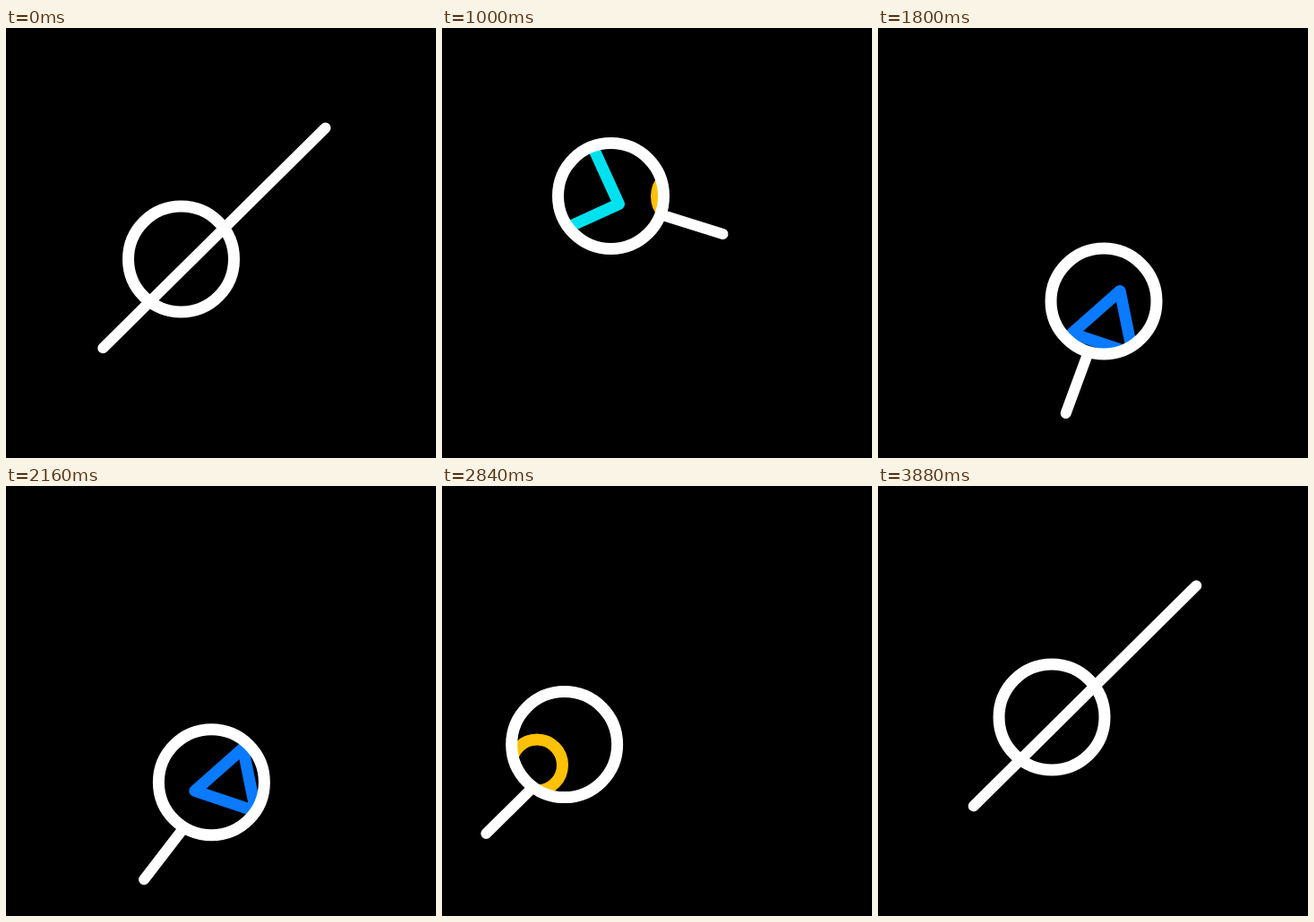
These frames come from a looping animation (480x480 px, 4.48 s). An HTML page with a canvas:

```html
<!DOCTYPE html>
<html lang="en">
<head>
<meta charset="utf-8">
<title>Magnifying glass</title>
<style>
  html, body { margin: 0; width: 100%; height: 100%; overflow: hidden; background: #000; }
  canvas { display: block; }
</style>
</head>
<body>
<canvas width="480" height="480"></canvas>
<script>
const ctx = document.querySelector('canvas').getContext('2d');
const LOOP = 4480, STEP = 40, MOVE_END = 3880;
const LENS_RADIUS = 59, SHAPE_LIFE = 1000;

// Points the lens passes through: time, x, y
const path = [
  [0, 195.5, 258], [360, 239.5, 204], [560, 219, 178], [1000, 188.5, 187.5],
  [1120, 182.5, 199.5], [1800, 252, 305], [2240, 214.5, 331], [2440, 158.5, 321],
  [2800, 137, 291.5], [3240, 156, 264], [3360, 170.5, 259.5], [3880, 194, 258]
];

// Shapes drift by (dx, dy) per second and are at (x, y) at time `at`; no sides means a circle.
const shapes = [
  { color: '#ffc107', at: 360, x: 244, y: 180, dx: 37.5, dy: 12.5, radius: 28.5 },
  { color: '#00e1ef', at: 1000, x: 149.8, y: 178.7, dx: 37.5, dy: 12.5, radius: 50.9, sides: 4, turn: 20.5 },
  { color: '#0a7aff', at: 1800, x: 257, y: 332.7, dx: -15.6, dy: -1.6, radius: 41.4, sides: 3, turn: -71.5 },
  { color: '#ffc107', at: 2840, x: 106, y: 311.5, dx: 10, dy: -3.8, radius: 28.5 }
];

const radians = degrees => degrees * Math.PI / 180;
const clamp = (v, low, high) => Math.min(high, Math.max(low, v));

function smooth(t, from, to) {
  const p = clamp((t - from) / (to - from), 0, 1);
  return p * p * (3 - 2 * p);
}

// Half turn of the handle: speeds up until `middle`, then slows down.
function turnProgress(t) {
  const middle = 1180, end = 2800;
  return t < middle
    ? (t / middle) ** 2.25 / 2
    : 1 - (Math.max(0, end - t) / (end - middle)) ** 2.65 / 2;
}

function slope(i, axis) {
  if (i === 0 || i === path.length - 1) return 0;
  const [a, b, c] = path.slice(i - 1, i + 2);
  const before = b[0] - a[0], after = c[0] - b[0];
  return ((b[axis] - a[axis]) / before * after + (c[axis] - b[axis]) / after * before) / (before + after);
}

// Cubic curve through the path points
function lensAt(t) {
  const i = Math.max(1, path.findIndex(point => point[0] >= t));
  const a = path[i - 1], b = path[i], span = b[0] - a[0];
  const p = (t - a[0]) / span, q = 1 - p;
  return [1, 2].map(axis =>
    q * q * (1 + 2 * p) * a[axis] + p * p * (1 + 2 * q) * b[axis] +
    span * p * q * (q * slope(i - 1, axis) - p * slope(i, axis)));
}

function stroke(color, width, trace) {
  ctx.strokeStyle = color;
  ctx.lineWidth = width;
  ctx.beginPath();
  trace();
  ctx.stroke();
}

function drawShape({ color, at, x, y, dx, dy, radius, sides, turn }, t) {
  const age = t - at;
  if (Math.abs(age) > SHAPE_LIFE) return;
  const cx = x + dx * age / 1000, cy = y + dy * age / 1000;
  stroke(color, 13, () => {
    if (!sides) return ctx.arc(cx, cy, radius, 0, 2 * Math.PI);
    for (let i = 0; i < sides; i++) {
      const angle = radians(turn + i * 360 / sides);
      ctx.lineTo(cx + radius * Math.cos(angle), cy + radius * Math.sin(angle));
    }
    ctx.closePath();
  });
}

function drawHandle(x, y, t) {
  const start = -131.8 + 191 * smooth(t, 0, 455) - 277 * smooth(t, 3360, MOVE_END);
  const end = 217.5 - 85.5 * smooth(t, 0, 640);
  const offset = clamp(0.0086 * (1390 - t), -9.2, 9.2);
  ctx.save();
  ctx.translate(x, y);
  ctx.rotate(radians(-44.7 + 180 * turnProgress(t)));
  stroke('#fff', 12, () => {
    ctx.moveTo(start, offset);
    ctx.lineTo(end, offset);
  });
  ctx.restore();
}

function draw(t) {
  const [x, y] = lensAt(t);
  const lens = () => ctx.arc(x, y, LENS_RADIUS, 0, 2 * Math.PI);
  ctx.clearRect(0, 0, 480, 480);
  ctx.lineCap = ctx.lineJoin = 'round';

  ctx.save();
  ctx.beginPath();
  lens();
  ctx.clip();
  shapes.forEach(shape => drawShape(shape, t));
  ctx.restore();

  stroke('#fff', 13, lens);
  drawHandle(x, y, t);
}

const origin = performance.now();
function tick() {
  const t = (performance.now() - origin) % LOOP;
  draw(Math.min(Math.floor(t / STEP) * STEP, MOVE_END));
  requestAnimationFrame(tick);
}
tick();
</script>
</body>
</html>
```
